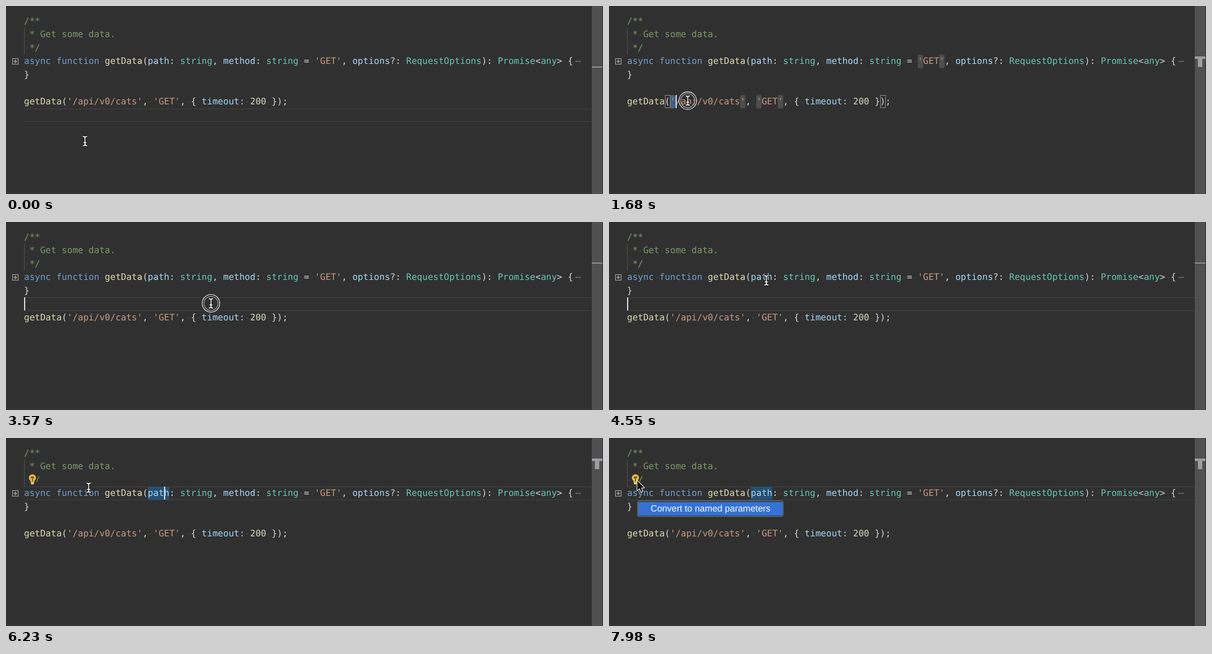
An HTML page with a canvas for the animation above (8 s loop, 960 by 302 pixels).

```html
<!DOCTYPE html>
<html lang="en">
<head>
<meta charset="utf-8">
<title>Editor refactoring</title>
<style>
  html, body { margin: 0; height: 100%; overflow: hidden; background: #303030; }
  canvas { display: block; }
</style>
</head>
<body>
<canvas id="stage" width="960" height="302"></canvas>
<script>
const ctx = document.getElementById('stage').getContext('2d');
const LOOP = 8000, LEFT = 29, TOP = 13.4, CHAR = 8.655, ROW = 21.6;

const GREEN = '#7d9a68', BLUE = '#6fa0d2', YELLOW = '#dcdcb0', CYAN = '#a4dafa',
      TEAL = '#62c9b3', ORANGE = '#cc9a82', NUMBER = '#d3d9bd', PLAIN = '#d6d6d6';

// Each line is a flat list: colour, text, colour, text ...
const code = [
  [GREEN, '/**'],
  [GREEN, ' * Get some data.'],
  [GREEN, ' */'],
  [BLUE, 'async function ', YELLOW, 'getData', PLAIN, '(', CYAN, 'path', PLAIN, ': ', TEAL, 'string',
   PLAIN, ', ', CYAN, 'method', PLAIN, ': ', TEAL, 'string', PLAIN, ' = ', ORANGE, "'GET'", PLAIN, ', ',
   CYAN, 'options', PLAIN, '?: ', TEAL, 'RequestOptions', PLAIN, '): ', TEAL, 'Promise',
   PLAIN, '<', TEAL, 'any', PLAIN, '> {'],
  [PLAIN, '}'],
  [],
  [YELLOW, 'getData', PLAIN, '(', ORANGE, "'/api/v0/cats'", PLAIN, ', ', ORANGE, "'GET'",
   PLAIN, ', { ', CYAN, 'timeout:', PLAIN, ' ', NUMBER, '200', PLAIN, ' });'],
];

// Pointer stops: time, x, y
const route = [
  [0, 127, 217], [650, 127, 217], [1000, 103, 195], [1350, 99, 153], [1490, 100, 152],
  [2600, 439, 152], [3050, 439, 152], [3450, 330, 131], [4150, 325, 127], [4500, 253, 94],
  [4800, 253, 92], [5900, 253, 92], [6500, 45, 71], [8000, 45, 70],
];
const PRESS = { drag: 1400, blank: 3520, word: 4900, bulb: 6620 };
const presses = [[PRESS.drag, 2600], [PRESS.blank, 3600], [PRESS.word, 4980], [PRESS.bulb, 6720]];
const BULB_AT = 5200, MENU_AT = 7200;

const colX = col => LEFT + col * CHAR;
const rowY = row => TOP + row * ROW;
const smooth = p => p * p * (3 - 2 * p);

function pointerAt(t) {
  const i = Math.max(1, route.findIndex(stop => stop[0] > t));
  const [t0, x0, y0] = route[i - 1], [t1, x1, y1] = route[i];
  const p = smooth((t - t0) / (t1 - t0));
  return { x: x0 + (x1 - x0) * p, y: y0 + (y1 - y0) * p };
}

function rect(color, x, y, w, h, radius = 0) {
  ctx.fillStyle = color;
  ctx.beginPath();
  ctx.roundRect(x, y, w, h, radius);
  ctx.fill();
}

function cells(color, row, from, to, radius = 2) {
  rect(color, colX(from), rowY(row), (to - from) * CHAR, ROW, radius);
}

function drawCode() {
  ctx.font = '14.377px "DejaVu Sans Mono", monospace';
  ctx.textRendering = 'geometricPrecision';
  code.forEach((line, row) => {
    let col = 0;
    for (let i = 0; i < line.length; i += 2) {
      for (const ch of line[i + 1]) {
        if (ch === ' ') {
          rect('#525252', colX(col) + 3.6, rowY(row) + 10.4, 1.5, 1.5);
        } else {
          ctx.fillStyle = line[i];
          ctx.fillText(ch, colX(col), rowY(row) + 15.1);
        }
        col++;
      }
    }
  });
  for (let i = 0; i < 3; i++) rect('#858585', 916 + i * 3, 88, 1.8, 1.8);
  rect('#505050', 29, 35, 1, 43);
  ctx.strokeStyle = '#a8a8a8';
  ctx.lineWidth = 1;
  ctx.strokeRect(10.5, 84.5, 9, 9);
  rect('#c4c4c4', 12, 88.5, 6, 1);
  rect('#c4c4c4', 14.5, 86, 1, 6);
}

function drawLineHighlight(row) {
  rect('#404040', LEFT, Math.round(rowY(row)), 913, 1);
  rect('#404040', LEFT, Math.round(rowY(row) + ROW - 1), 913, 1);
}

function drawRuler(row, highlighted) {
  const y = 33 + (row - 3) * 16;
  rect('#505050', 942, 0, 17, 302);
  if (highlighted) {
    rect('#a29ca4', 947, y, 7, 17);
    rect('#a29ca4', 942, y, 17, 4);
  } else {
    rect('#8c8c8c', 942, y, 17, 2);
  }
}

function drawBulb() {
  rect('#303030', 36, 57, 13, 19);
  ctx.fillStyle = '#e6b93c';
  ctx.beginPath();
  ctx.arc(42.5, 64, 5.8, 0, 7);
  ctx.fill();
  rect('#e6b93c', 39.5, 67, 6, 5);
  rect('#d0cdb8', 40, 72, 5, 2.5, 1);
  rect('#4a3d20', 40, 62, 5, 1.3);
  rect('#4a3d20', 40.5, 62, 1.2, 3);
  rect('#4a3d20', 43.3, 62, 1.2, 3);
  rect('#4a3d20', 42, 64, 1.1, 6);
}

function drawMenu() {
  rect('#7b8088', 45.5, 100.5, 235, 26, 4);
  rect('#29364c', 46.5, 101.5, 233, 24, 3);
  rect('#3572d4', 47, 103, 232, 21.5, 2);
  ctx.fillStyle = '#fff';
  ctx.font = '14.5px "Liberation Sans", Arial, sans-serif';
  ctx.fillText('Convert to named parameters', 67, 118);
}

function shape(path, x, y, fill, stroke, width) {
  ctx.save();
  ctx.translate(x, y);
  ctx.lineJoin = ctx.lineCap = 'round';
  ctx.lineWidth = width;
  const p = new Path2D(path);
  ctx.strokeStyle = stroke;
  ctx.stroke(p);
  if (fill) {
    ctx.fillStyle = fill;
    ctx.fill(p);
  }
  ctx.restore();
}

const IBEAM = 'M-3-7.5Q0-7.5 0-5Q0-7.5 3-7.5M0-5V5M-3 7.5Q0 7.5 0 5Q0 7.5 3 7.5M-2 2.5H2';
const ARROW = 'M0 0V15L3.5 11.8L6 17.5L8.6 16.4L6.2 10.8H11Z';
const HAND = 'M0 1Q0-1 1.2-1Q2.5-1 2.8 1L3.8 4Q6 3.2 6.3 5Q8.3 4.2 8.8 6Q10.6 6 10.4 8.5' +
             'L9.2 14H2.5Q0 10.5-2 8.5Q-2.5 6.8-.4 7.3L1.2 8.4Z';

function drawPointer(t, { x, y }) {
  if (t >= MENU_AT) {
    shape(ARROW, x + .5, y - 1, '#111', '#eee', 2);
  } else if (t > BULB_AT && x < 58) {
    shape(HAND, x - 1, y, '#f2f2f2', '#111', 1.6);
  } else {
    shape(IBEAM, x, y, null, '#151515', 3.4);
    shape(IBEAM, x, y, null, '#f4f4f4', 1.5);
  }
}

// Ring holds while the button is down, then grows and fades.
function drawRing(t, { x, y }) {
  for (const [down, up] of presses) {
    if (t < down || t > up + 300) continue;
    const p = Math.max(0, (t - up) / 300);
    const r = 14 + 24 * (1 - (1 - p) ** 2);
    ctx.globalAlpha = 1 - p * p;
    ctx.lineWidth = 1.3;
    for (const [radius, color] of [[r, '#e4e4e4'], [r - 1.3, '#202020'], [r - 2.6, '#a0a0a0']]) {
      ctx.strokeStyle = color;
      ctx.beginPath();
      ctx.arc(x, y, radius, 0, 7);
      ctx.stroke();
    }
    ctx.globalAlpha = 1;
  }
}

function editorState(t) {
  if (t < PRESS.drag) return { row: 7, col: 0, since: -600 };
  if (t < PRESS.blank) {
    const col = Math.min(47, Math.max(8, Math.round((pointerAt(t - 70).x - LEFT) / CHAR)));
    return { row: 6, col, since: t < 2600 ? t : 2600, selecting: col > 8 };
  }
  if (t < PRESS.word) return { row: 5, col: 0, since: PRESS.blank };
  return { row: 3, col: 26, since: PRESS.word };
}

function draw(t) {
  const { row, col, since, selecting } = editorState(t);
  const pointer = pointerAt(t);
  const quoteSelected = selecting && col === 9;
  const onWord = row === 3;

  rect('#303030', 0, 0, 960, 302);
  rect('#39373b', 0, 300, 942, 1);
  if (!selecting) drawLineHighlight(row);
  if (selecting) cells('#415f88', 6, 8, col, 3);
  if (quoteSelected) {
    for (const [r, c] of [[3, 54], [3, 58], [6, 21], [6, 24], [6, 28]]) cells('#4d4d4d', r, c, c + 1);
  }
  if (onWord) cells('#264f70', 3, 23, 27);
  if (row === 6 && col <= 9) {
    ctx.strokeStyle = '#858585';
    ctx.lineWidth = 1;
    for (const c of [7, 47]) ctx.strokeRect(Math.round(colX(c)) + .5, 143.5, 8, 20);
  }
  drawCode();
  drawRuler(row, quoteSelected || onWord);
  if ((t - since) % 1000 < 500 && t < MENU_AT) {
    rect('#d4d4d4', Math.round(colX(col)), Math.round(rowY(row)), 2, 21);
  }
  if (t >= BULB_AT) drawBulb();
  if (t >= MENU_AT) drawMenu();
  drawRing(t, pointer);
  drawPointer(t, pointer);
}

const start = performance.now();
function tick() {
  draw((performance.now() - start) % LOOP);
  requestAnimationFrame(tick);
}
tick();
</script>
</body>
</html>
```
